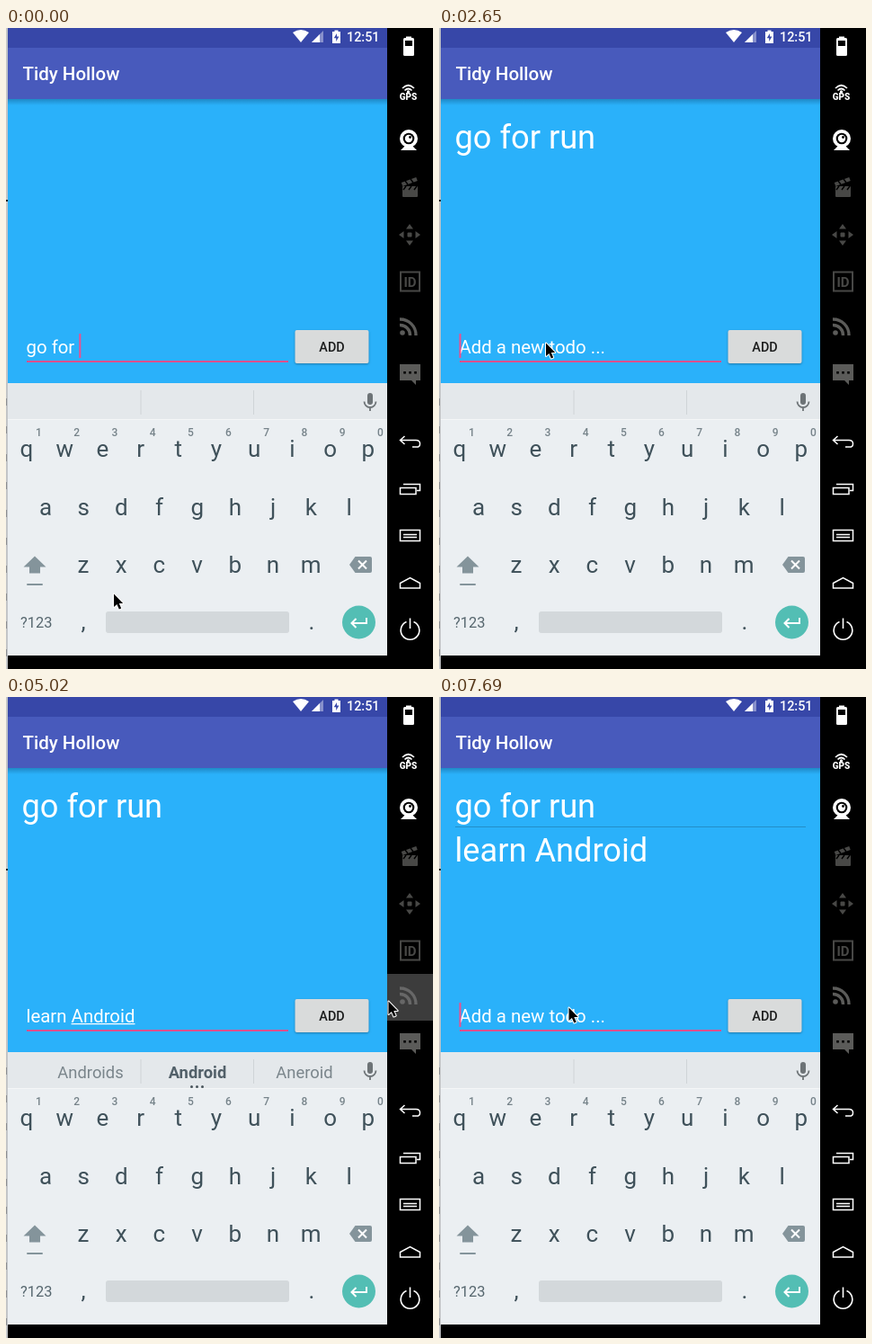
Animation of 475x713 px, one loop 8000 ms. Source, as an HTML page with a canvas:

```html
<!DOCTYPE html>
<html lang="en">
<head>
<meta charset="utf-8">
<title>Todo app</title>
<style>
html, body { margin: 0; width: 475px; height: 713px; overflow: hidden; background: #000; }
canvas { display: block; width: 475px; height: 713px; }
</style>
</head>
<body>
<canvas id="stage"></canvas>
<script>
const LOOP = 8000, TICK = 147.5;
const HINT = 'Add a new todo ...';
const canvas = document.getElementById('stage');
const c = canvas.getContext('2d');
const dpr = window.devicePixelRatio || 1;
canvas.width = 475 * dpr;
canvas.height = 713 * dpr;
c.scale(dpr, dpr);

// Times below are in ticks; an edit also restarts the caret blink.
const edits = [
  [-1, 'go for '], [0.8, 'go for r'], [1.8, 'go for ru'], [2.8, 'go for run'], [11.2, ''],
  [19.8, 'l'], [20.8, 'le'], [21.8, 'lear'], [22.8, 'learn'], [23.8, 'learn '],
  [25.8, 'learn A'], [26.8, 'learn An'], [27.8, 'learn And'], [28.8, 'learn Andro'],
  [29.8, 'learn Android'], [37.8, '']
];
const hints = [
  [0, ''], [2, 'run|ru|rub'], [4, 'runs|run|running'], [12, ''],
  [21, 'let|le|left'], [22, 'leave|lea|learn'], [23, 'learned|learn|learning'], [24, ''],
  [27, 'Any|An|And'], [29, 'Andy|And|Andrew'], [31, 'Androids|Android|Aneroid'], [38, '']
];
const todos = [[12, 'go for run'], [38, 'learn Android']];
const clicks = [11, 37];
const mousePath = [
  [3, 120, 629], [8, 344.5, 352], [12, 344.5, 352], [15, 119, 350], [29, 119, 350],
  [32, 390, 326], [33, 421, 332], [34, 425.5, 338], [36, 345, 350], [37, 345, 351],
  [38, 170, 349], [39, 134, 347], [41, 134, 347], [43, 144.5, 345]
];

const latest = (rows, k) => rows.filter(r => r[0] <= k).pop();

function mouseAt(k) {
  const i = mousePath.findIndex(p => p[0] > k);
  if (i === 0) return mousePath[0].slice(1);
  if (i < 0) return mousePath[mousePath.length - 1].slice(1);
  const [a, ax, ay] = mousePath[i - 1], [b, bx, by] = mousePath[i];
  const u = (k - a) / (b - a);
  return [ax + (bx - ax) * u, ay + (by - ay) * u];
}

function rect(x, y, w, h, color, r = 0) {
  c.fillStyle = color;
  c.beginPath();
  c.roundRect(x, y, w, h, r);
  c.fill();
}
function disc(x, y, r, color) {
  c.fillStyle = color;
  c.beginPath();
  c.arc(x, y, r, 0, 7);
  c.fill();
}
function fill(d, color) { c.fillStyle = color; c.fill(new Path2D(d), 'evenodd'); }
function line(d, color, w = 1.5) {
  c.strokeStyle = color;
  c.lineWidth = w;
  c.stroke(new Path2D(d));
}
function text(s, x, y, size, color, weight = 400, align = 'left') {
  c.font = `${weight} ${size}px Roboto, sans-serif`;
  c.fillStyle = color;
  c.textAlign = align;
  c.fillText(s, x, y);
}

function drawApp() {
  rect(0, 0, 2, 713, '#c3c5c7');
  rect(0, 191, 2, 2, '#222');
  for (let y = 412; y < 700; y += 31) rect(0, y, 1, 8, '#8d8f92');
  rect(2, 0, 422, 395, '#2ab1fa');
  const g = c.createLinearGradient(0, 79, 0, 86);
  g.addColorStop(0, 'rgba(0,30,60,.27)');
  g.addColorStop(1, 'rgba(0,30,60,0)');
  rect(2, 79, 422, 7, g);
  rect(2, 0, 422, 22, '#3747a8');
  rect(2, 22, 422, 57, '#485abc');
  text('Tidy Hollow', 18.5, 58, 20.5, '#fff', 500);

  fill('M319 5Q328 -1 337 5L328 16Z', '#fff');
  fill('M340 16H353V3Z', 'rgba(255,255,255,.4)');
  fill('M340 16H349V7Z', '#fff');
  fill('M363 4H365.5V2.5H369.5V4H372V17H363ZM368 6L364.8 11.2H367.2V15L370.4 9.6H368Z', '#fff');
  text('12:51', 379, 15, 14.4, '#fff', 500);
}

function drawKeyboard() {
  const ink = '#3f515a', soft = '#84949b';
  rect(2, 395, 422, 303, '#ebeff2');
  rect(2, 395, 422, 41, '#e4e8eb');
  rect(2, 435, 422, 1, '#f4f6f7');
  rect(149.5, 403, 1, 27, '#cfd4d7');
  rect(275, 403, 1, 27, '#cfd4d7');
  rect(402, 406, 6, 13, '#6d7376', 3);
  line('M398.500 415.500a6.500 6.500 0 0 0 13 0M405 422V426', '#6d7376', 1.8);

  const row = (keys, x, y) => [...keys].forEach((ch, i) =>
    text(ch, x + i * 42.2, y, 26, ink, 400, 'center'));
  row('qwertyuiop', 23, 477);
  row('asdfghjkl', 44, 542);
  row('zxcvbnm', 86, 606);
  [...'1234567890'].forEach((n, i) => text(n, 36.5 + i * 42.2, 454, 12, '#76838a', 500, 'center'));

  fill('M32 587.500L44.500 599.500H38V606.500H26V599.500H19.500Z', soft);
  rect(23, 618, 18, 2, soft, 1);
  fill('M382 597L388.500 588H405Q407 588 407 590V604Q407 606 405 606H388.500Z', soft);
  line('M392 592.500L401 601.500M401 592.500L392 601.500', '#fff', 2);
  text('?123', 16, 667, 16.4, '#56666e');
  text(',', 86, 669, 26, ink, 400, 'center');
  text('.', 340, 669, 26, ink, 400, 'center');
  rect(111, 649, 204, 24, '#d3d8db', 3);
  disc(392.5, 661, 18.5, '#53beb4');
  line('M401 656V662H385M389.500 657L384.500 662L389.500 667', '#fff', 2);
  rect(2, 698, 422, 15, '#000');
}

function drawSidebar(hover) {
  const dim = '#484846', w = '#fff';
  rect(424, 0, 51, 713, '#000');
  if (hover) rect(424, 308, 51, 52, '#3c3c3c');

  rect(442, 11, 12, 20, w, 1.5);
  rect(445, 9.5, 6, 3, w);
  rect(444, 14, 8, 6, '#000');

  text('GPS', 447.5, 80, 10, w, 900, 'center');
  disc(447.5, 71, 1.7, w);
  line('M443.500 69.500Q447.500 65.500 451.500 69.500M441 67Q447.500 60.500 454 67', w, 1.7);

  disc(448, 123, 10, w);
  disc(448, 123, 6.3, '#000');
  disc(448, 123, 4.2, w);
  disc(449.5, 121.5, 1.4, '#000');
  fill('M444 131H452L457 136H439Z', w);

  rect(441, 176, 17, 12, dim, 1);
  line('M440.500 174L457 168', dim, 4.5);
  line('M444 170L447 174M450 168L453 172M445 176L442 180M451 176L448 180M457 176L454 180', '#000', 1.4);

  fill('M449 218L453 223.500H445ZM449 242L453 236.500H445ZM437 230L442.500 226V234ZM461 230L455.500 226V234Z', dim);
  rect(446.5, 227.5, 5, 5, dim, 1);

  line('M439 271.500H460V292.500H439Z', dim, 2);
  text('ID', 449.5, 287.5, 15, dim, 700, 'center');

  const rss = hover ? '#676767' : '#5b5b59';
  disc(441, 339, 2.8, rss);
  line('M438 330.500A11 11 0 0 1 449.500 342M438 324A17.500 17.500 0 0 1 456 342', rss, 3.4);

  fill('M438 374H461V392H456V397L451 392H438Z', '#5b5b59');
  for (const x of [443.5, 449.5, 455.5]) rect(x - 1.3, 382, 2.6, 2.6, '#000');

  line('M443.500 454L438.500 458.500L443.500 463M439 458.500H456Q460.500 458.500 460.500 462.500T456 466H452', w);
  line('M438.500 511.500H456V518.500H438.500ZM442 507.500H460.500V514.500H457', w);
  line('M438.500 558.500H460.500V570.500H438.500ZM442 563.500H457M442 566.500H457', w);
  line('M438.500 623V617.500L449.500 611.500L460.500 617.500V623Z', w);
  line('M445.500 660.500A10.300 10.300 0 1 0 453.500 660.500M449.500 656.500V668', w, 1.6);
}

function drawButton(k) {
  const age = k - (clicks.filter(t => t <= k).pop() ?? -9);
  const pressed = age < 3;
  c.save();
  c.shadowColor = pressed ? 'rgba(0,0,0,.28)' : 'rgba(0,0,0,.32)';
  c.shadowBlur = (pressed ? 6 : 2.5) * dpr;
  c.shadowOffsetY = (pressed ? 2 : 1) * dpr;
  rect(321.5, 336, 82, 37, pressed ? '#d4d5d5' : '#d9dbdb', 2);
  c.restore();
  if (pressed && age > 0) {
    c.save();
    c.beginPath();
    c.rect(321.5, 336, 82, 37);
    c.clip();
    disc(346, 355, age === 1 ? 8 : 32, `rgba(0,0,0,${age === 1 ? 0.07 : 0.04})`);
    c.restore();
  }
  text('ADD', 362.5, 360, 14.4, '#1b1c1c', 500, 'center');
}

function drawField(k) {
  const [start, value] = latest(edits, k);
  const x = 22.5, pink = '#ee4f8d';
  rect(23, 370, 291, 2, pink);
  text(value || HINT, x, 361.5, 20.4, '#fff');
  const end = x + c.measureText(value).width;
  const word = value.split(' ').pop();
  if (word.length > 1) {
    const width = c.measureText(word).width;
    rect(end - width, 363, width, 1.2, '#fff');
  }
  if (Math.floor((k - start) / 3.39) % 2 === 0) rect(end, 340, 2, 27, pink);
}

function drawHints(k) {
  const [, words] = latest(hints, k);
  if (!words) return;
  words.split('|').forEach((s, i) => text(s, 94 + i * 119, 424, 18.4,
    i === 1 ? '#526069' : '#7a858b', i === 1 ? 700 : 400, 'center'));
  for (const x of [206.5, 212.5, 218.5]) disc(x, 433.5, 1.5, '#48545b');
}

function drawMouse(x, y) {
  c.save();
  c.translate(x, y + 0.5);
  c.lineJoin = 'round';
  const arrow = 'M0 0V14.500L3.400 11.400L5.800 17L8.200 16L5.800 10.500H10.200Z';
  line(arrow, '#fff', 2);
  fill(arrow, '#000');
  c.restore();
}

function draw(ms) {
  const k = Math.floor((ms % LOOP + 8) / TICK);
  const [mx, my] = mouseAt(k);
  drawApp();
  todos.filter(t => t[0] <= k).forEach(([, s], i) => {
    if (i) rect(18, 144, 390, 1, 'rgba(0,0,0,.2)');
    text(s, 17.5, 134 + i * 49, 36.2, '#fff');
  });
  drawField(k);
  drawButton(k);
  drawKeyboard();
  drawHints(k);
  drawSidebar(mx > 424 && my > 308 && my < 360);
  drawMouse(mx, my);
}

const t0 = performance.now();
(function loop() {
  draw(performance.now() - t0);
  requestAnimationFrame(loop);
})();
</script>
</body>
</html>
```
